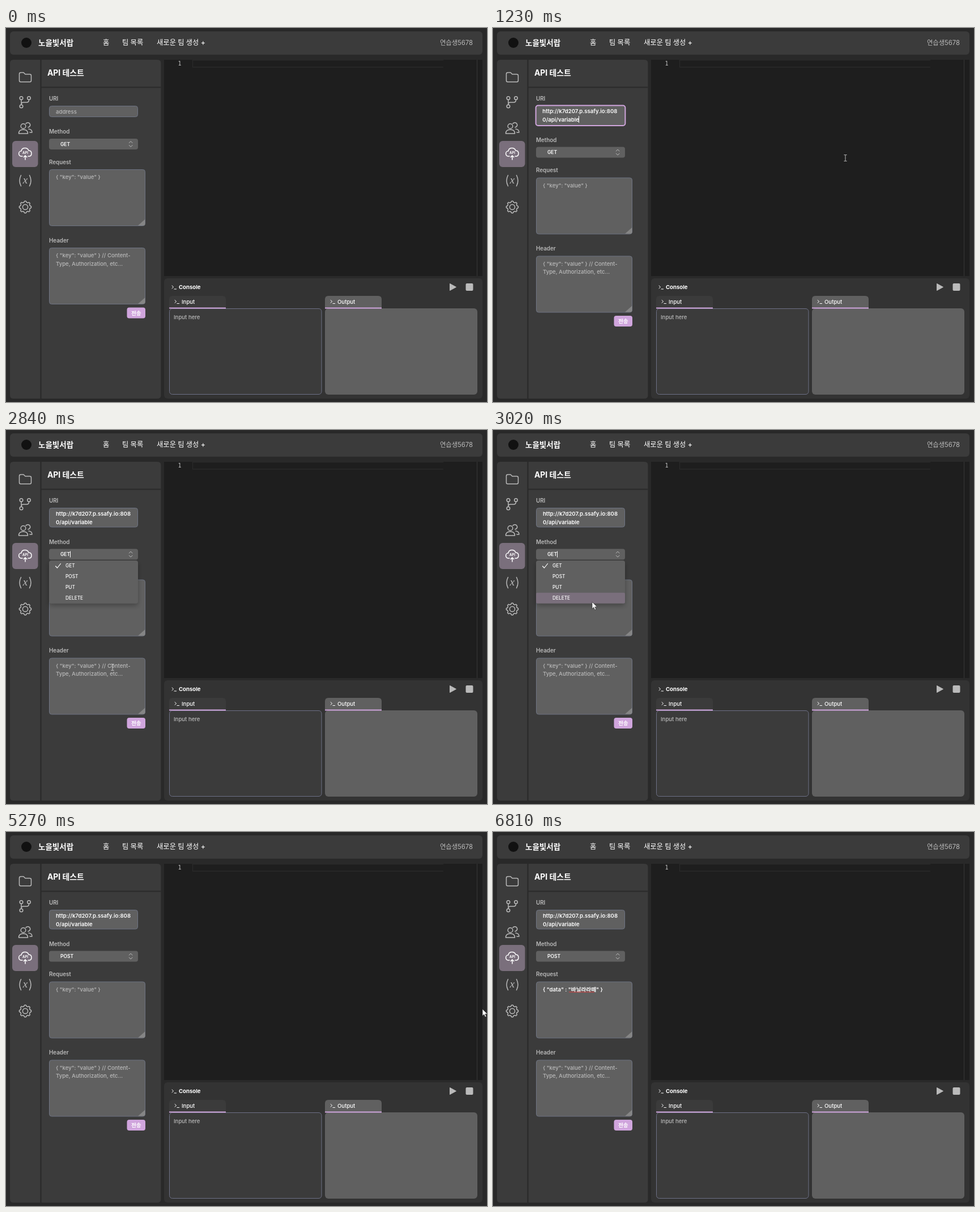
An HTML page for the animation above (7.99 s loop, 849x659 px).

```html
<!DOCTYPE html>
<html lang="ko">
<head>
<meta charset="utf-8">
<title>API 테스트</title>
<style>
html, body { margin: 0; width: 100%; height: 100%; overflow: hidden; background: #292929; }
svg { display: block; width: 849px; height: 659px; }
text { font: 500 9.6px Inter, "Noto Sans CJK KR", "Noto Sans CJK", sans-serif; fill: #bababa; white-space: pre; }
.nav text { font-size: 12.3px; fill: #fff; }
.label { font-weight: 600; font-size: 9.8px; }
.value { font-weight: 600; fill: #fff; }
.method { font-weight: 600; font-size: 8.5px; fill: #fff; }
.opt { font-size: 8.3px; fill: #fff; }
.panel { fill: #3b3b3b; }
.field { fill: #606060; stroke: #6d7382; }
.field.focus { stroke: #d0a5dd; stroke-width: 2; }
.line { fill: none; stroke: #bababa; stroke-width: 1.5; stroke-linecap: round; stroke-linejoin: round; }
.white { stroke: #fff; fill: none; }
.accent { fill: #d0a5dd; }
.caret { fill: #fff; }
</style>
</head>
<body>
<svg viewBox="0 0 849 659">
  <defs>
    <path id="prompt" class="line" style="stroke:#fff;stroke-width:1" d="M0 0l2.6 2.4-2.6 2.4M4 6h3.6"/>
    <path id="grip" d="M245.500 337v8q0 3-3 3H233z" fill="#858585"/>
    <filter id="shadow" x="-20%" y="-20%" width="140%" height="150%">
      <feDropShadow dx="0" dy="4" stdDeviation="4" flood-opacity=".28"/>
    </filter>
  </defs>

  <!-- top bar -->
  <rect class="panel" x="7" y="6" width="834" height="41" rx="6"/>
  <circle cx="36" cy="26" r="9" fill="#111"/>
  <g class="nav">
    <text x="57" y="30.500" style="font-weight:700;font-size:13.5px">노을빛서랍</text>
    <text x="171" y="30">홈</text>
    <text x="205" y="30">팀 목록</text>
    <text x="266" y="30">새로운 팀 생성 +</text>
  </g>
  <text x="824" y="30" text-anchor="end" style="font-size:11.3px;font-weight:400">연습생5678</text>

  <!-- sidebar -->
  <path class="panel" d="M60.500 56H13q-6 0-6 6v585q0 6 6 6h47.500z"/>
  <rect x="11" y="199" width="45.500" height="46" rx="6" fill="#7a6f7c"/>
  <g class="line">
    <path d="M23.500 81q0-2.500 2.500-2.500h5l3 3h8q2.500 0 2.500 2.500v8.500q0 2.500-2.500 2.500H26q-2.500 0-2.500-2.500z"/>
    <circle cx="27" cy="123.500" r="2.800"/><circle cx="40.500" cy="123.500" r="2.800"/><circle cx="27" cy="138" r="2.800"/>
    <path d="M27 126.500v8.500M40.500 126.500q0 4.500-4 4.500H31q-4 0-4 4"/>
    <circle cx="30.500" cy="173" r="4.300"/>
    <path d="M22.500 186q0-7 8-7t8 7zM35 168.500a4.200 4.200 0 1 1 4 6.500M40 178q6 .5 6 6h-4"/>
    <path class="white" d="M29 226h-1.500a4.600 4.600 0 0 1-.5-9.200q.8-5.300 6.500-5.300 5 0 6.500 4.500 5 0 5 5t-4.500 5H39M34 232v-7M31.300 227.500l2.700-2.700 2.700 2.700"/>
    <path d="M26.500 259.500q-5 9.500 0 19M41.500 259.500q5 9.500 0 19"/>
    <path id="gear"/><circle cx="34" cy="315.500" r="4.600"/>
  </g>
  <text x="34" y="222" text-anchor="middle" style="font-size:6px;font-weight:700;fill:#fff">API</text>
  <text x="34" y="273.500" text-anchor="middle" style="font:italic 19px 'Liberation Serif',serif">x</text>

  <!-- request form -->
  <path class="panel" d="M62.500 56H267q6.500 0 6.500 6v585q0 6-6.500 6H62.500z"/>
  <rect x="62" y="103.500" width="211.500" height="2" fill="#2b2b2b"/>
  <text x="73" y="84" style="font-weight:700;font-size:13.9px;fill:#fff">API 테스트</text>
  <text class="label" x="76" y="127.500">URI</text>
  <rect id="uri" rx="4"/>
  <g id="uriText">
    <text id="uriHint" x="88" y="151">address</text>
    <g id="uriValue">
      <text class="value" x="88" y="151">http://k7d207.p.ssafy.io:808</text>
      <text class="value" x="88" y="165.500">0/api/variable</text>
    </g>
  </g>
  <rect id="uriCaret" class="caret" width="1" height="12"/>
  <g id="rest">
    <text class="label" x="76" y="186">Method</text>
    <rect id="select" x="76" y="195" width="157" height="19" rx="4"/>
    <text id="method" class="method" x="96" y="207.500"></text>
    <rect id="selCaret" class="caret" x="113" y="199" width="1" height="11"/>
    <path class="line" style="stroke-width:1" d="M217.300 202.500l2.900-3 2.900 3M217.300 206.500l2.900 3 2.900-3"/>
    <text class="label" x="76" y="239.500">Request</text>
    <rect id="req" rx="4"/>
    <use href="#grip" id="reqGrip"/>
    <text id="reqHint" x="88" y="266">{ "key": "value" }</text>
    <g id="reqValue">
      <text class="value" x="88" y="266">{ "data" : "바닐라라떼" }</text>
      <path d="M134 267.500h45" stroke="#e03c3c"/>
    </g>
    <rect id="reqCaret" class="caret" y="256" width="1" height="12"/>
    <g id="header">
      <text class="label" x="76" y="377.500">Header</text>
      <rect class="field" x="76.500" y="387.500" width="169" height="99" rx="4"/>
      <use href="#grip" y="138"/>
      <text x="88" y="404">{ "key": "value" } // Content-</text>
      <text x="88" y="418.500">Type, Authorization, etc...</text>
      <rect class="accent" x="213.500" y="492.500" width="32.500" height="19" rx="4"/>
      <text x="229.800" y="505.500" text-anchor="middle" style="font-weight:700;fill:#fff">전송</text>
    </g>
  </g>

  <!-- editor -->
  <rect x="279" y="56" width="562" height="381" fill="#1e1e1e"/>
  <path d="M772 56.500H329.500v12.500H772" fill="none" stroke="#2a2a2a" stroke-width="1.400"/>
  <path d="M831.500 56v381" stroke="#363636"/>
  <text x="303.500" y="66" style="font:10px 'DejaVu Sans Mono',monospace;fill:#c6c6c6">1</text>

  <!-- console -->
  <rect x="279" y="441" width="562" height="212" rx="6" fill="#333"/>
  <use href="#prompt" x="293" y="454"/>
  <text x="305" y="459.500" style="font-weight:700;fill:#fff">Console</text>
  <path d="M783.500 450.500v12l11-6z" fill="#bababa" stroke="#bababa" stroke-linejoin="round"/>
  <rect x="811.500" y="450" width="13" height="13" rx="2" fill="#bababa"/>
  <path class="panel" d="M288 494v-16q0-6 6-6h88q6 0 6 6v16z"/>
  <use href="#prompt" x="298" y="479.500"/>
  <text x="310" y="485.500" style="fill:#fff">Input</text>
  <rect class="panel" x="288.500" y="494.500" width="268.500" height="151" rx="5" stroke="#6d7086"/>
  <rect class="accent" x="288" y="492.500" width="100" height="2"/>
  <text x="296" y="513">Input here</text>
  <path d="M563 494v-16q0-6 6-6h88q6 0 6 6v16z" fill="#606060"/>
  <use href="#prompt" x="573" y="479.500"/>
  <text x="585" y="485.500" style="fill:#fff">Output</text>
  <rect x="563" y="494" width="269" height="152" rx="6" fill="#606060"/>
  <rect class="accent" x="563" y="492.500" width="100" height="2"/>

  <!-- method menu -->
  <g id="menu">
    <rect x="76" y="230" width="157" height="75.500" rx="4" fill="#606060" filter="url(#shadow)"/>
    <rect id="active" x="76" width="157" height="18.900" rx="2" fill="#7a6f7c"/>
    <path id="check" class="line" style="stroke:#fff;stroke-width:1.200" d="M87.500 240l3 3 6-7.500"/>
  </g>

  <path id="arrow" d="M0 0v12l2.800-2.600 2 4.600 2-.9-2-4.400h3.900z" fill="#fff" stroke="#222" stroke-width=".6"/>
  <path id="beam" d="M-2.500-5.500h2q.5 0 .5.500 0-.5.500-.5h2M0-5V5M-2.500 5.500h2q.5 0 .5-.5 0 .5.500.5h2" fill="none" stroke="#d0d0d0" stroke-width=".9"/>
</svg>
<script>
const LOOP = 7990, STEP = 90, GROW = 14.5, EDGE = 1.4;
const $ = id => document.getElementById(id);
const set = (id, attrs) => { for (const k in attrs) $(id).setAttribute(k, attrs[k]); };
const show = (id, on) => { $(id).style.display = on ? '' : 'none'; };
const shift = (id, x, y) => set(id, { transform: `translate(${x} ${y})` });

// Pointer runs: start, end, then one position per step
const runs = [
  [500, 1320, [[838, 645], [660, 470], [420, 290], [210, 165], [150, 148], [160, 149], [330, 178], [520, 214], [622, 229]]],
  [1770, 2580, [[655, 265], [698, 305], [520, 290], [250, 262], [74, 245], [190, 209], [215, 214], [214, 217], [212, 219]]],
  [2580, 3200, [[210, 220], [208, 222], [200, 270], [188, 418], [180, 350], [175, 303]]],
  [3200, 3920, [[174, 297], [172, 286], [171, 276], [169, 265], [168, 262], [168, 262], [350, 278], [738, 303]]],
  [5270, 6090, [[841, 312], [640, 308], [400, 300], [220, 295], [150, 290], [170, 292], [360, 312], [570, 338], [691, 349]]]
];

function pointer(t) {
  const run = runs.find(r => t >= r[0] && t < r[1]);
  if (!run) return null;
  const i = Math.floor((t - run[0] + 12) / STEP);
  return run[2][Math.min(i, run[2].length - 1)];
}

const inside = ([x, y], l, t, r, b) => x >= l && x < r && y >= t && y < b;

function box(id, x, y, w, h, focus) {
  const pad = focus ? 1 : 0.5;
  set(id, { class: focus ? 'field focus' : 'field', x: x + pad, y: y + pad, width: w - 2 * pad, height: h - 2 * pad });
}

function render(t) {
  const between = (a, b) => t >= a && t < b;
  const pasted = t >= 1230, sent = t >= 6010;
  const uriFocus = between(860, 2670), reqFocus = between(5630, 6810);
  const open = between(2670, 3740), post = t >= 3650;
  const dy = pasted ? GROW : 0;
  const p = pointer(t);

  const e = uriFocus ? EDGE : 0;
  box('uri', 76 - e, 137 - e, 157 + 2 * e, 20 + dy + 2 * e, uriFocus);
  shift('uriText', -e / 2, -e / 2);
  show('uriHint', !pasted);
  show('uriValue', pasted);
  show('uriCaret', uriFocus && !between(1770, 2310));
  set('uriCaret', pasted ? { x: 151, y: 155 } : { x: 87, y: 141 });

  shift('rest', 0, dy);
  const onSelect = p && inside(p, 76, 195 + dy, 233, 214 + dy);
  set('select', { fill: onSelect && !open ? '#7a6f7c' : '#606060' });
  $('method').textContent = post ? 'POST' : 'GET';
  show('selCaret', between(2670, 3200));

  const f = reqFocus ? EDGE : 0;
  box('req', 76 - f, 249 - f, 170, 100, reqFocus);
  shift('reqGrip', -f, -f);
  for (const id of ['reqHint', 'reqValue']) shift(id, -f / 2, -f / 2);
  show('reqHint', !sent);
  show('reqValue', sent);
  show('reqCaret', reqFocus && t < 6540);
  set('reqCaret', { x: sent ? 187 : 87 });
  shift('header', 0, -2 * f);

  show('menu', open);
  $('menu').style.opacity = post ? 0.6 : 1;
  let row = p ? Math.floor((p[1] - 230) / 18.9) : -1;
  if (onSelect) row = 0;
  show('active', row >= 0 && row < 4);
  set('active', { y: 230 + row * 18.9 });
  shift('check', 0, post ? 18.9 : 0);

  const beam = p && (onSelect || inside(p, 279, 56, 831, 437) || inside(p, 288, 494, 557, 646) ||
    inside(p, 76, 137, 233, 157 + dy) ||
    (!open && inside(p, 76, 249 + dy, 246, 349 + dy)) || inside(p, 76, 387 + dy, 246, 487 + dy));
  show('beam', beam);
  show('arrow', p && !beam);
  if (p) shift(beam ? 'beam' : 'arrow', p[0], p[1]);
}

['GET', 'POST', 'PUT', 'DELETE'].forEach((name, i) => {
  const el = document.createElementNS('http://www.w3.org/2000/svg', 'text');
  el.textContent = name;
  el.setAttribute('class', 'opt');
  el.setAttribute('x', 105);
  el.setAttribute('y', 242.3 + i * 18.9);
  $('menu').append(el);
});

let gear = '';
for (let i = 0; i < 32; i++) {
  const a = (i - 0.5) * Math.PI / 16, r = i % 4 < 2 ? 10.6 : 8.6;
  gear += (i ? 'L' : 'M') + (34 + r * Math.cos(a)).toFixed(2) + ' ' + (315.5 + r * Math.sin(a)).toFixed(2);
}
set('gear', { d: gear + 'z' });

const start = performance.now();
function tick() {
  render((performance.now() - start) % LOOP);
  requestAnimationFrame(tick);
}
tick();
</script>
</body>
</html>
```
